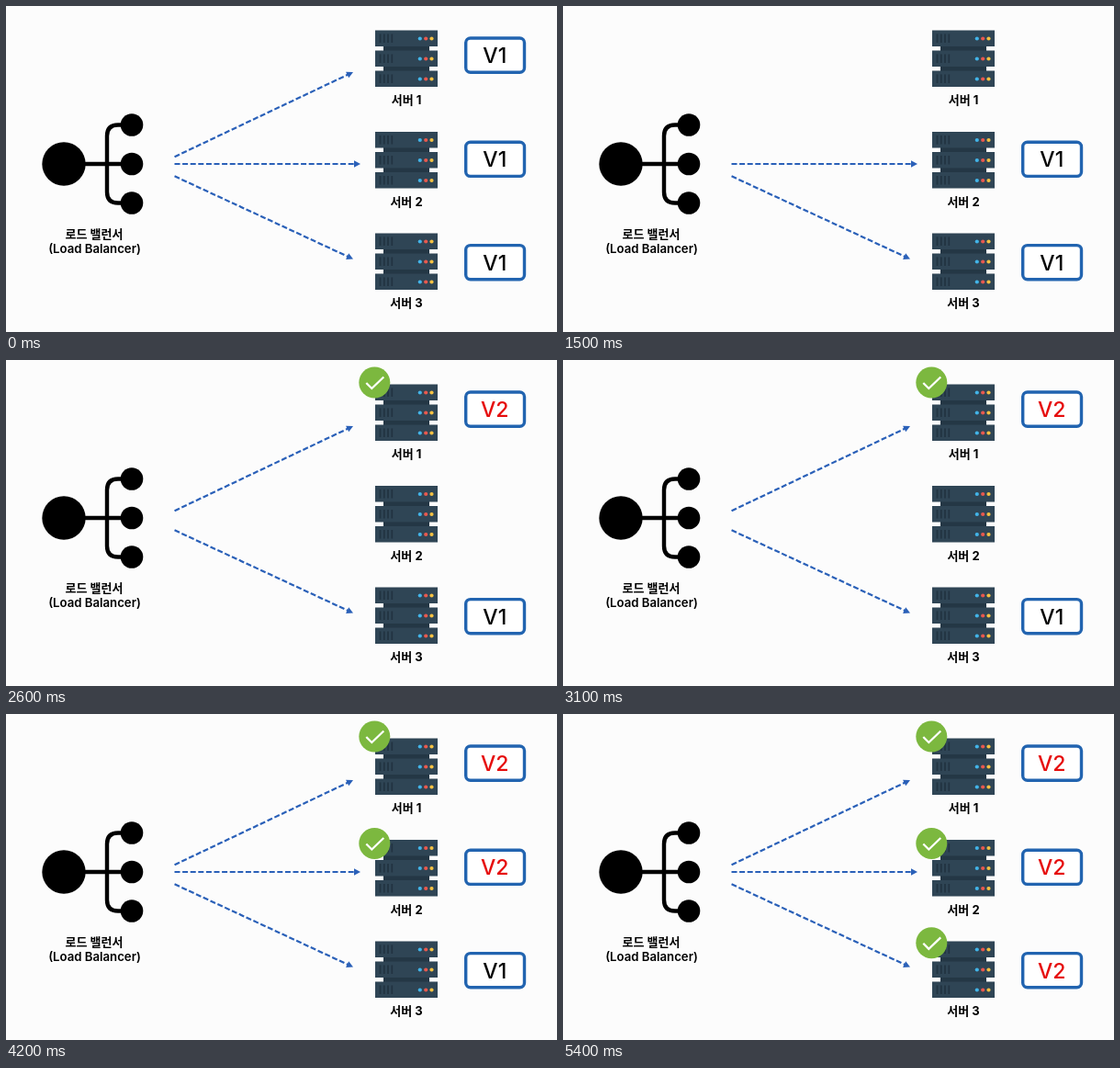
Recreate the animation shown at these times as an HTML page. Size 600 by 355 pixels, loop 5.8 s.

```html
<!DOCTYPE html>
<html lang="ko">
<head>
<meta charset="utf-8">
<style>
  html, body { margin: 0; width: 100%; height: 100%; overflow: hidden; background: #fcfcfc; }
  svg { display: block; }
  text { text-anchor: middle; font-family: Inter, "Noto Sans CJK KR", "Noto Sans CJK", sans-serif; }
  .label { font-size: 13.2px; font-weight: 600; }
  .ko { font-size: 13px; font-weight: 700; }
  .version { font-size: 23px; font-weight: 500; }
</style>
</head>
<body>
<svg id="stage" width="600" height="355" viewBox="0 0 600 355">
  <defs>
    <g id="slab">
      <path d="M0 0H68V17.5H0Z" fill="#2f4555"/>
      <path d="M5.5 4V13.5M9.8 4V13.5M14 4V13.5M18.3 4V13.5" stroke="#213341" stroke-width="1.7"/>
      <circle cx="48.8" cy="9" r="2.1" fill="#42b4e8"/>
      <circle cx="55.2" cy="9" r="2.1" fill="#e9594f"/>
      <circle cx="61.5" cy="9" r="2.1" fill="#f2c042"/>
    </g>
    <g id="server">
      <path d="M9 10H59V52H9Z" fill="#243745"/>
      <use href="#slab"/>
      <use href="#slab" y="22"/>
      <use href="#slab" y="44"/>
    </g>
    <g id="check">
      <circle r="17" fill="#7cb83f"/>
      <path d="M-9 .5L-3 6.5L10 -6" fill="none" stroke="#fff" stroke-width="2.3"/>
    </g>
  </defs>
  <circle cx="63" cy="172" r="23.7"/>
  <circle cx="137" cy="129.5" r="12.3"/>
  <circle cx="137" cy="172" r="12.3"/>
  <circle cx="137" cy="214.5" r="12.3"/>
  <path d="M80 172H130M130 129.5H122Q110 129.5 110 141.5V202.5Q110 214.5 122 214.5H130"
        fill="none" stroke="#000" stroke-width="4.4"/>
  <text class="ko" x="96" y="253">로드 밸런서</text>
  <text class="label" x="96.5" y="269">(Load Balancer)</text>
</svg>
<script>
const stage = document.getElementById('stage');
const LOOP = 5800, STEP = 900, FIRST = 700;
const BLUE = '#2a60b8';

// Arrow start and end, then the heights of server, version box and check mark
const rows = [
  { arrow: [184, 164, 378, 72], server: 26.5, box: 53.6, check: 24.5 },
  { arrow: [184, 172, 386, 172], server: 137, box: 166.8, check: 141 },
  { arrow: [184, 185.5, 378, 275.5], server: 247.5, box: 279.2, check: 249.3 }
];

function arrow([x1, y1, x2, y2]) {
  const len = Math.hypot(x2 - x1, y2 - y1);
  const angle = Math.atan2(y2 - y1, x2 - x1) * 180 / Math.PI;
  return `<g transform="translate(${x1} ${y1}) rotate(${angle})">
    <path d="M-.5 0H${len - 6}" stroke="${BLUE}" stroke-width="2.2" stroke-dasharray="6 2.6"/>
    <path d="M${len} 0l-7 -3.7v7.4z" fill="${BLUE}"/></g>`;
}

const parts = rows.map((row, i) => {
  const g = document.createElementNS('http://www.w3.org/2000/svg', 'g');
  g.innerHTML = `
    <use href="#server" x="402" y="${row.server}"/>
    <text class="ko" x="436" y="${row.server + 80.7}">서버 ${i + 1}</text>
    <g class="live">${arrow(row.arrow)}
      <rect x="500.7" y="${row.box - 18.6}" width="63.8" height="37.2" rx="5"
            fill="#fff" stroke="#2264b0" stroke-width="3.4"/>
      <text class="version" x="532.3" y="${row.box + 8.3}"></text>
    </g>
    <use class="done" href="#check" x="401.3" y="${row.check}"/>`;
  stage.append(g);
  const find = name => g.querySelector(name);
  return { live: find('.live'), done: find('.done'), version: find('.version') };
});

const show = (el, on) => el.setAttribute('visibility', on ? 'visible' : 'hidden');

// Each server in turn goes offline for one step, then returns upgraded
function draw(now) {
  const step = Math.floor((now % LOOP - FIRST) / STEP);
  parts.forEach((part, i) => {
    const upgraded = step > 2 * i;
    show(part.live, step !== 2 * i);
    show(part.done, upgraded);
    part.version.textContent = upgraded ? 'V2' : 'V1';
    part.version.setAttribute('fill', upgraded ? '#e60c0c' : '#000');
  });
}

const start = performance.now();
function tick() {
  draw(performance.now() - start);
  requestAnimationFrame(tick);
}
tick();
</script>
</body>
</html>
```
